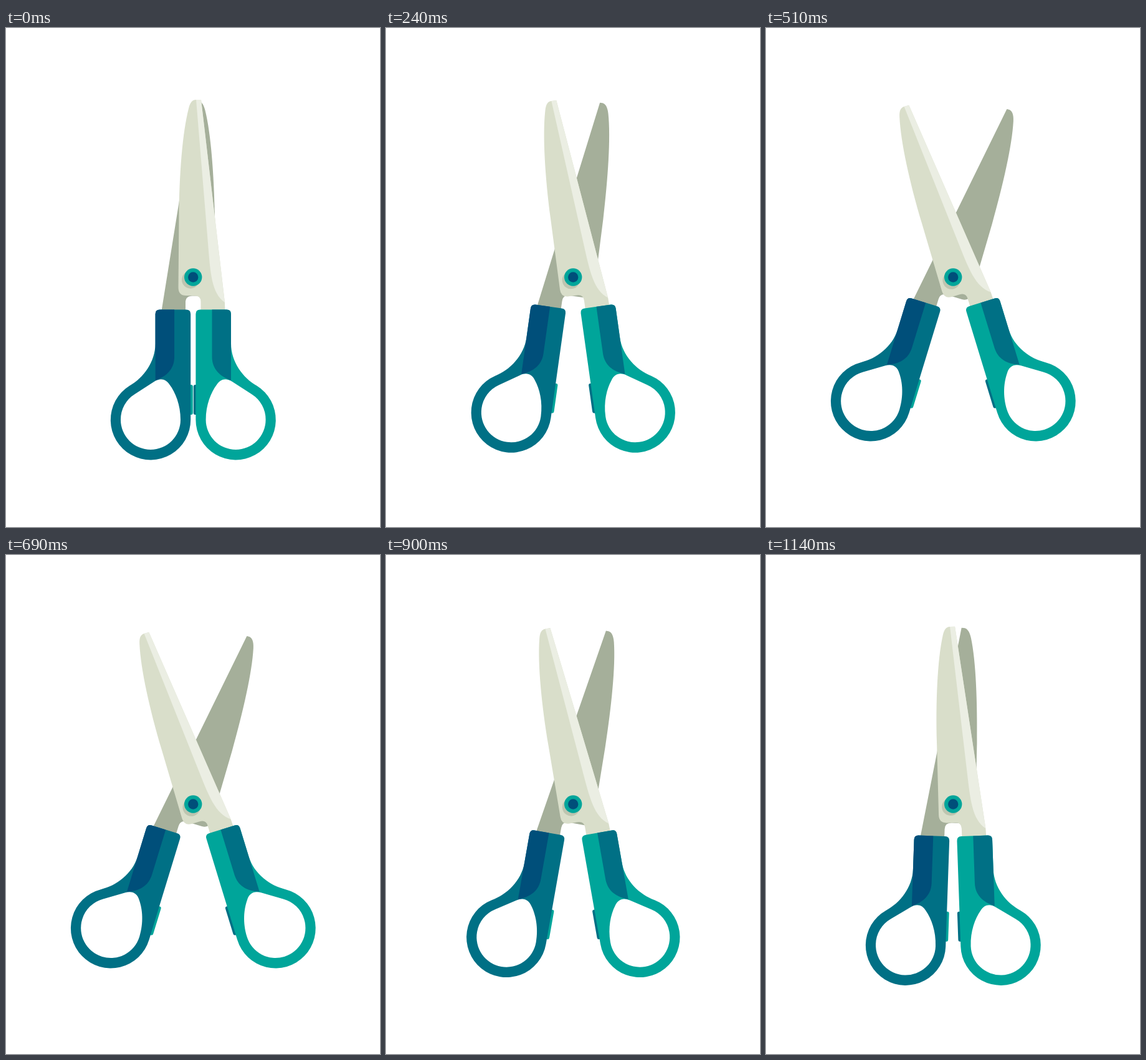
An HTML page with a canvas for the animation above (1170 ms loop, 600 by 800 pixels).

```html
<!DOCTYPE html>
<html lang="en">
<head>
<meta charset="utf-8">
<title>Scissors</title>
<style>
  html, body { margin: 0; width: 100%; height: 100%; overflow: hidden; background: #fff; }
  canvas { display: block; }
</style>
</head>
<body>
<canvas id="stage" width="600" height="800"></canvas>
<script>
const ctx = document.getElementById('stage').getContext('2d');

const PIVOT = { x: 300.3, y: 399.5 };
const STEP = 30, STEPS = 39, PEAK = 20;
const GREEN = '#00a59a', TEAL = '#007085', NAVY = '#004f7a';
const LIGHT = '#d9deca', SHINE = '#ebeee3', DARK = '#a5af9a', SHADOW = '#bec5b0';

// All outlines describe the closed scissors.
const frontBlade = new Path2D(`M305 115 H313 L351 440 L351.5 456 H312.5 V439
  Q312.5 429 302 429 H289 Q276.5 429 276.5 416 L277.5 300
  C278 235 283 168 293 129 C295.5 119 299 115 305 115 Z`);
const shine = new Path2D(`M305 115 H313 L351 440 C330 425 328 395 324 345 Z`);
const backBlade = new Path2D(`M303.8 116.5 H308 C313 117 317 122 319.5 132
  C329 170 333.5 235 335 300 L336.5 416 Q336.5 429 324 429.5 H299
  Q288 429.5 288 440 V456 H249.1 Z`);

// The handle is drawn for the right side and mirrored for the left.
const handle = new Path2D(`M311.5 451.5 H354 Q361 451.5 361 458.5 V506
  C361 535 380 561 402.3 573.6 A64.2 64.2 0 1 1 304.4 628 V458.5
  Q304.4 451.5 311.5 451.5 Z
  M416.6 628 A48 48 0 0 1 320.6 628 C320.6 604 329 584 338 572
  C344 562.5 353 560.5 363 567 L394 587 A48 48 0 0 1 416.6 628 Z`);
const stripe = new Path2D(`M330.5 451.5 H354 Q361 451.5 361 458.5 V565
  C342 558 330.5 546 330.5 527 Z`);
const tab = new Path2D(`M306 572 H303.5 Q300.8 572 300.8 575 V617
  Q300.8 620 303.5 620 H306 Z`);

function fill(path, color, rule = 'nonzero') {
  ctx.fillStyle = color;
  ctx.fill(path, rule);
}

function disc(x, y, radius, color) {
  ctx.fillStyle = color;
  ctx.beginPath();
  ctx.arc(x, y, radius, 0, Math.PI * 2);
  ctx.fill();
}

function rotated(degrees, draw) {
  ctx.save();
  ctx.translate(PIVOT.x, PIVOT.y);
  ctx.rotate(degrees * Math.PI / 180);
  ctx.translate(-PIVOT.x, -PIVOT.y);
  draw();
  ctx.restore();
}

function drawHandle(body, accent, tabColor) {
  fill(tab, tabColor);
  fill(handle, body, 'evenodd');
  fill(stripe, accent);
}

function drawBack() {
  fill(backBlade, DARK);
  ctx.translate(2 * PIVOT.x, 0);
  ctx.scale(-1, 1);
  drawHandle(TEAL, NAVY, GREEN);
}

function drawFront() {
  fill(frontBlade, LIGHT);
  fill(shine, SHINE);
  disc(296, 403.7, 14, SHADOW);
  drawHandle(GREEN, TEAL, TEAL);
}

function render(time) {
  const step = Math.floor(time / STEP) % STEPS;
  const angle = PEAK - Math.abs(PEAK - step);
  ctx.fillStyle = '#fff';
  ctx.fillRect(0, 0, 600, 800);
  rotated(angle, drawBack);
  rotated(-angle, drawFront);
  disc(300.2, 399.5, 14.2, GREEN);
  disc(300.2, 399.5, 8.2, NAVY);
}

let start;
function tick(now) {
  start ??= now;
  render(now - start);
  requestAnimationFrame(tick);
}
render(0);
requestAnimationFrame(tick);
</script>
</body>
</html>
```
